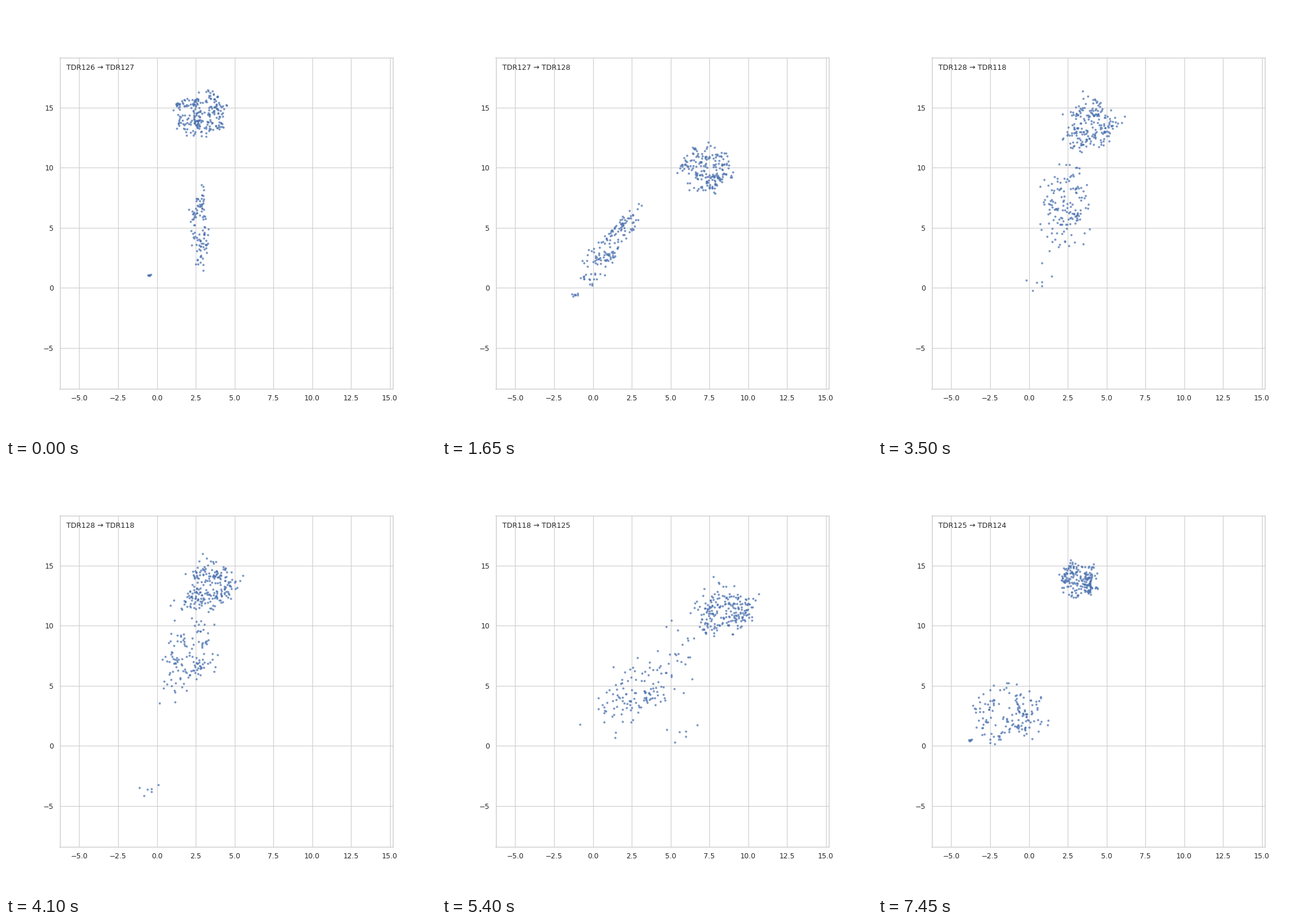
Recreate the animation shown at these times as a matplotlib script. Size 748 by 748 pixels, loop 7500 ms.

```python
import numpy as np
import matplotlib.pyplot as plt
from matplotlib.animation import FuncAnimation

STEPS = 30
STAGES = ["TDR126", "TDR127", "TDR128", "TDR118", "TDR125", "TDR124"]
FRAMES = STEPS * (len(STAGES) - 1)
INK, GRID, BLUE = "#262626", "#cccccc", "#4c72b0"

N_UPPER, N_BRIDGE, N_LOWER, N_STRAY = 195, 45, 104, 6
N = N_UPPER + N_BRIDGE + N_LOWER
PER_HUB = 3

rng = np.random.default_rng(126)


def disc(n):
    r, a = np.sqrt(rng.random(n)), rng.uniform(0, 2 * np.pi, n)
    return r * np.exp(1j * a)


# Complex plane: every point hangs loosely on a slowly circling hub.
n_hubs = -(-N // PER_HUB)
hubs = np.repeat(disc(n_hubs), PER_HUB)[:N]
drift = np.repeat(rng.normal(0, .5, n_hubs), PER_HUB)[:N]
jitter = rng.normal(size=N) + 1j * rng.normal(size=N)
stray_offsets = disc(N_STRAY)

# Key places of the two clouds and the stray group, in stage units.
TIMES = np.array([0, .53, 1.1, 1.9, 2.73, 3.2, 3.6, 4.4, 4.75, 4.97])
UPPER = [2.75 + 14.6j, 6.7 + 13j, 7.2 + 10j, 5.3 + 13.3j, 3.4 + 13.4j,
         4.9 + 12.8j, 8.6 + 11.3j, 11.2 + 9.8j, 7.2 + 14.4j, 3.2 + 13.8j]
LOWER = [2.7 + 4.9j, 1.2 + 3.6j, 1.1 + 3.5j, 2.6 + 5.2j, 2 + 7.2j,
         2.1 + 6j, 2.8 + 4.5j, 3 + 3.1j, .1 + 3j, -1.4 + 2.6j]
STRAY = [-.5 + 1.1j, -3 - 6.4j, -1.2 - .5j, 1.4 + 3.8j, -.6 - 3.4j,
         -.9 - 7j, 5.6 + 1.4j, -1.2 + 1.8j, -3 + .8j, -3.8 + .5j]
LEAN = [.1, .8, 1.8, .5, .2, .6, 1.2, 1.3, .8, .3]
# Bridge points sit in the upper cloud at -0.5 and in the lower one at 1.5.
BRIDGE = [-.5, .4, 1.5, 1.4, .5, .5, .5, 1.5, 1.5, 1.3]

KEYS = np.array([UPPER, LOWER, STRAY, LEAN, BRIDGE]).T
SPEED = np.gradient(KEYS, TIMES, axis=0, edge_order=2)
RANK = np.concatenate([np.full(N_UPPER, -9), np.linspace(-.5, .5, N_BRIDGE),
                       np.full(N_LOWER, 9)])


def key_values(t):
    """Cubic Hermite curve through the key places."""
    k = int(np.clip(np.searchsorted(TIMES, t, "right") - 1, 0, len(TIMES) - 2))
    h = TIMES[k + 1] - TIMES[k]
    u = (t - TIMES[k]) / h
    return ((2 * u**3 - 3 * u**2 + 1) * KEYS[k]
            + (u**3 - 2 * u**2 + u) * h * SPEED[k]
            + (3 * u**2 - 2 * u**3) * KEYS[k + 1]
            + (u**3 - u**2) * h * SPEED[k + 1])


def positions(t):
    upper, lower, stray, lean, level = key_values(t)
    loose = np.sin(np.pi * t) ** 2
    swell = np.exp(-((t - 4.55) / .25) ** 2)
    unit = .9 * hubs * np.exp(1j * drift * t) + jitter * (.1 + .14 * loose)
    x, y = unit.real, unit.imag

    size = 1.85 + 1.4 * swell - .6 * (t / 5) ** 8
    top = upper + size * x + 1j * (1.1 * size + swell) * y

    width = .7 + .4 * t + swell
    height = 3.8 - .24 * t + 2 * swell
    bottom = lower + width * x + (lean.real + 1j * height) * y

    share = np.clip(level.real + RANK, 0, 1)
    cloud = top + (bottom - top) * share
    strays = stray + (.1 + 1.2 * loose) * stray_offsets
    z = np.concatenate([cloud, strays])
    return np.column_stack([z.real, z.imag])


plt.rcParams["font.family"] = "DejaVu Sans"
fig = plt.figure(figsize=(9.35, 9.35), dpi=80, facecolor="white")
ax = fig.add_axes([.125, .11, .775, .77])
ax.set(xlim=(-6.257, 15.205), ylim=(-8.378, 19.16))
ax.set_xticks(np.arange(-5, 15.1, 2.5))
ax.set_yticks(np.arange(-5, 15.1, 5))
ax.set_axisbelow(True)
ax.grid(color=GRID, linewidth=1)
ax.tick_params(length=0, pad=9.5, labelsize=11, labelcolor=INK)
for spine in ax.spines.values():
    spine.set(color=GRID, linewidth=1.25)

dots = ax.scatter(*positions(0).T, s=6.5, color=BLUE, alpha=.65, linewidths=.9)
label = ax.text(.02, .981, "", transform=ax.transAxes, va="top", size=11.25, color=INK)


def draw(i):
    stage = i // STEPS
    dots.set_offsets(positions(i / STEPS))
    label.set_text(f"{STAGES[stage]} → {STAGES[stage + 1]}")
    return dots, label


anim = FuncAnimation(fig, draw, frames=FRAMES, interval=50, repeat=True, repeat_delay=0)
plt.show()
```
